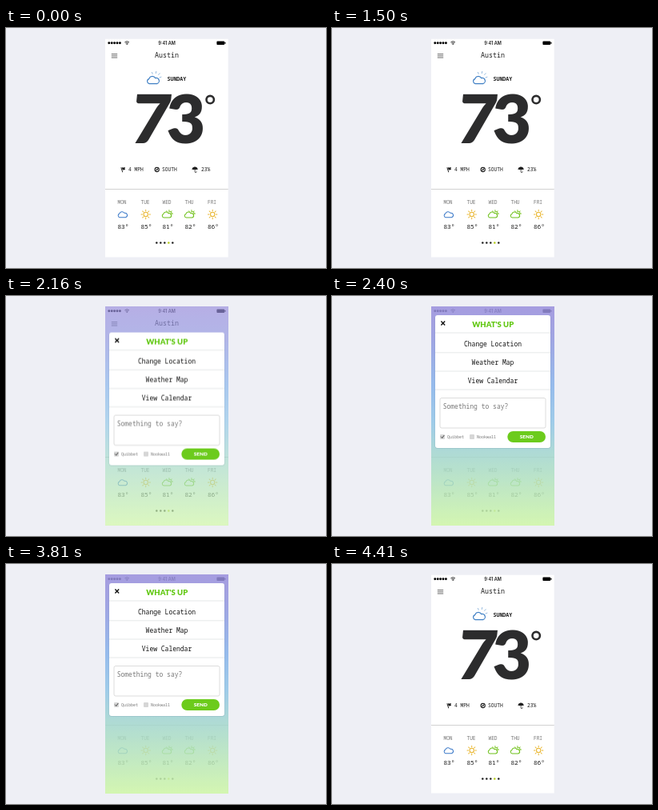
Write an HTML page that moves like this. It is 400 by 300 pixels and loops after 4.44 s.

```html
<!DOCTYPE html>
<html lang="en">
<head>
<meta charset="utf-8">
<title>Weather menu</title>
<style>
  html, body { margin: 0; width: 100%; height: 100%; overflow: hidden; background: #eeeff5; }
  svg { display: block; width: 400px; height: 300px; }
  text { font-family: "Noto Sans Mono", monospace; fill: #1c1c1c; }
  .mid { text-anchor: middle; }
  .heavy { font-family: Lato, sans-serif; font-weight: 900; }
  .clock { font: 600 5.5px Inter, sans-serif; }
  .place { font-size: 8.3px; }
  .today { font-size: 6.67px; font-weight: 700; }
  .fact { font-size: 6.25px; font-weight: 500; }
  .day { font-size: 6.2px; fill: #777; }
  .temp { font-size: 7.8px; font-weight: 500; }
  .big { font-size: 84px; fill: #2c2c2d; }
  .item { font-size: 8px; fill: #111; }
  .small { font-size: 5px; fill: #777; }
  .line { fill: none; stroke-linecap: round; stroke-linejoin: round; }
</style>
</head>
<body>
<svg viewBox="0 0 400 300">
  <defs>
    <clipPath id="screen"><rect x="124" y="13.7" width="153.7" height="272.8"/></clipPath>
    <linearGradient id="sky" x1="0" y1="0" x2="0" y2="1">
      <stop offset="0" stop-color="#988ddb"/>
      <stop offset=".16" stop-color="#9098df"/>
      <stop offset=".36" stop-color="#85b1e9"/>
      <stop offset=".53" stop-color="#90c4e6"/>
      <stop offset=".68" stop-color="#a3d6cd"/>
      <stop offset="1" stop-color="#cdf5a5"/>
    </linearGradient>
    <path id="cloud" d="M-4 3.5a2.6 2.6 0 0 1-.2-5a3.6 3.6 0 0 1 6.6-.8a2.9 2.9 0 0 1 1.8 5.8z"/>
  </defs>
  <g clip-path="url(#screen)">
    <rect x="124" y="13" width="154" height="274" fill="#fff"/>

    <g id="status">
      <path class="line" d="M148.7 17.6q2.5-2.2 5 0M149.8 19q1.4-1.2 2.8 0" stroke="#1c1c1c" stroke-width=".9"/>
      <circle cx="151.2" cy="20.3" r=".7"/>
      <text class="clock mid" x="201" y="21">9:41 AM</text>
      <rect x="263.4" y="16.5" width="9.8" height="4.6" rx="1"/>
      <rect x="273.4" y="17.8" width="1.1" height="2" rx=".5"/>
    </g>

    <path d="M131.8 32.6h7.4M131.8 34.8h7.4M131.8 37h7.4" stroke="#444" stroke-width=".8"/>
    <text class="place mid" x="201" y="37.3">Austin</text>

    <g class="line" stroke="#3f7fc4">
      <use href="#cloud" transform="translate(183.8 65.4) scale(1.2)" stroke-width="1"/>
      <path d="M183.2 57.4l-.8-2M187.3 56.6l.4-2.2M190.6 58.4l1.5-1.7M192 62l2-.8" stroke="#8db5dc" stroke-width=".9"/>
    </g>
    <text class="today" x="201.4" y="66">SUNDAY</text>
    <text class="heavy big" transform="translate(154.2 143.9) skewX(-6)" x="-6.4">
      <tspan x="0">7</tspan>
    </text>
    <text class="heavy big" x="200.4" y="143.9">3</text>
    <circle cx="255.2" cy="89.6" r="4.7" fill="none" stroke="#2c2c2d" stroke-width="2.6"/>

    <g fill="#1c1c1c">
      <path d="M143.4 174.4l.8-.3 2 6-.8.3zM144.8 174.2l2 .4 2.4-.5-.9 1.3.9 1.4-2 .6-1.6-.2z"/>
      <circle cx="188.7" cy="177" r="2.6" fill="none" stroke="#1c1c1c" stroke-width="1.1"/>
      <path d="M186.9 178.8l1.1-2.4 2.5-1.2-1.1 2.4z"/>
      <path d="M232.5 177.2a3.6 3.4 0 0 1 7.2 0l-1.2-.5-1.2.5-1.2-.5-1.2.5-1.2-.5z"/>
      <path class="line" d="M236.1 173.4v6.2q0 1.2 1.1 1.1t.9-1.1" stroke="#1c1c1c" stroke-width=".7"/>
    </g>
    <text class="fact" x="153" y="179.3">4 MPH</text>
    <text class="fact" x="195" y="179.3">SOUTH</text>
    <text class="fact" x="244" y="179.3">23%</text>

    <path d="M124 201.5h154" stroke="#d2d2d2"/>
    <g id="week"></g>
    <g id="pager"></g>

    <rect id="tint" x="124" y="13" width="154" height="274" fill="url(#sky)" opacity="0"/>

    <g id="panel" transform="translate(0 290)">
      <rect x="128.5" y=".4" width="145" height="166.4" rx="3.6" fill="#39506e" opacity=".16"/>
      <rect x="129" y="0" width="144" height="166" rx="3" fill="#fff"/>
      <path d="M136.4 7.6l4.8 4.8M141.2 7.6l-4.8 4.8" stroke="#111" stroke-width="1.4"/>
      <text class="heavy mid" x="201.2" y="14.9" font-size="9.5" style="fill:#62c813">WHAT'S UP</text>
      <g id="menu"></g>
      <rect x="135" y="103.5" width="132" height="37.5" rx="2" fill="#fff" stroke="#d4d4d4" stroke-width=".8"/>
      <text class="item" x="138.7" y="116.5" style="fill:#777">Something to say?</text>
      <rect x="135" y="149" width="6" height="6" rx="1" fill="#d6d6d6"/>
      <path class="line" d="M136.4 152l1.3 1.5 2.3-3.1" stroke="#444" stroke-width="1"/>
      <rect x="172" y="149" width="6" height="6" rx="1" fill="#d6d6d6"/>
      <text class="small" x="144" y="153.8">Quibbet</text>
      <text class="small" x="181" y="153.8">Nookwall</text>
      <rect x="219.3" y="145" width="47.7" height="14" rx="7" fill="#6ccb1c"/>
      <text class="heavy mid" x="243.3" y="154.4" font-size="6.4" style="fill:#fff">SEND</text>
    </g>
  </g>
</svg>
<script>
const LOOP = 4440;
const $ = id => document.getElementById(id);

function add(parent, tag, attrs, text) {
  const el = document.createElementNS("http://www.w3.org/2000/svg", tag);
  for (const key in attrs) el.setAttribute(key, attrs[key]);
  if (text) el.textContent = text;
  return parent.appendChild(el);
}

function rays(from, to, r1, r2, cx = 0, cy = 0) {
  let d = "";
  for (let i = from; i <= to; i++) {
    const c = Math.cos(i * Math.PI / 4), s = Math.sin(i * Math.PI / 4);
    d += `M${cx + r1 * c} ${cy + r1 * s}L${cx + r2 * c} ${cy + r2 * s}`;
  }
  return d;
}

const icons = {
  cloud(g) {
    add(g, "use", { href: "#cloud", y: 0.5, stroke: "#3a78c8" });
  },
  sun(g) {
    add(g, "circle", { r: 2.9, stroke: "#e9b52c" });
    add(g, "path", { d: rays(0, 7, 4.6, 6.2), stroke: "#e9b52c" });
  },
  mixed(g) {
    add(g, "use", { href: "#cloud", x: -1, y: 0.9, stroke: "#6cc018" });
    add(g, "path", { d: "M1.8-3.4a2.4 2.4 0 0 1 3 3.8" + rays(-3, 0, 3.9, 5.1, 2.4, -1), stroke: "#84c934" });
  }
};

for (let i = 0; i < 5; i++) {
  add($("status"), "circle", { cx: 128.8 + i * 3.4, cy: 18.7, r: 1.45 });
  add($("pager"), "circle", { cx: 188.3 + i * 5, cy: 268.5, r: 1.25, fill: i === 3 ? "#b5cc18" : "#222" });
}

[
  ["MON", 145, "cloud", 83],
  ["TUE", 174, "sun", 85],
  ["WED", 201, "mixed", 81],
  ["THU", 229, "mixed", 82],
  ["FRI", 257.5, "sun", 86]
].forEach(([day, x, icon, temp]) => {
  const week = $("week");
  add(week, "text", { class: "day mid", x, y: 219.5 }, day);
  icons[icon](add(week, "g", { class: "line", "stroke-width": 1.1, transform: `translate(${x + 0.7} 233) scale(.92)` }));
  add(week, "text", { class: "temp mid", x: x + 1.4, y: 251 }, temp + "°");
});

["Change Location", "Weather Map", "View Calendar"].forEach((label, i) => {
  const y = 36.3 + i * 23;
  add($("menu"), "text", { class: "item mid", x: 201, y: y + 2.9 }, label);
});
for (const y of [22, 46.8, 70, 93])
  add($("menu"), "path", { d: `M129 ${y}h144`, stroke: "#dfe2e4", "stroke-width": 0.8 });

// Each step: time in ms, then the value there
function play(el, prop, steps) {
  el.animate(
    steps.map(([ms, value]) => ({ offset: ms / LOOP, [prop]: value, easing: "ease-in-out" })),
    { duration: LOOP, iterations: Infinity }
  );
}

const shut = "translateY(288px)", open = "translateY(24px)";
play($("panel"), "transform", [[0, shut], [1805, shut], [2250, open], [3870, open], [4320, shut], [LOOP, shut]]);
play($("tint"), "opacity", [[0, 0], [1790, 0], [2320, 0.86], [3850, 0.86], [4330, 0], [LOOP, 0]]);
</script>
</body>
</html>
```
